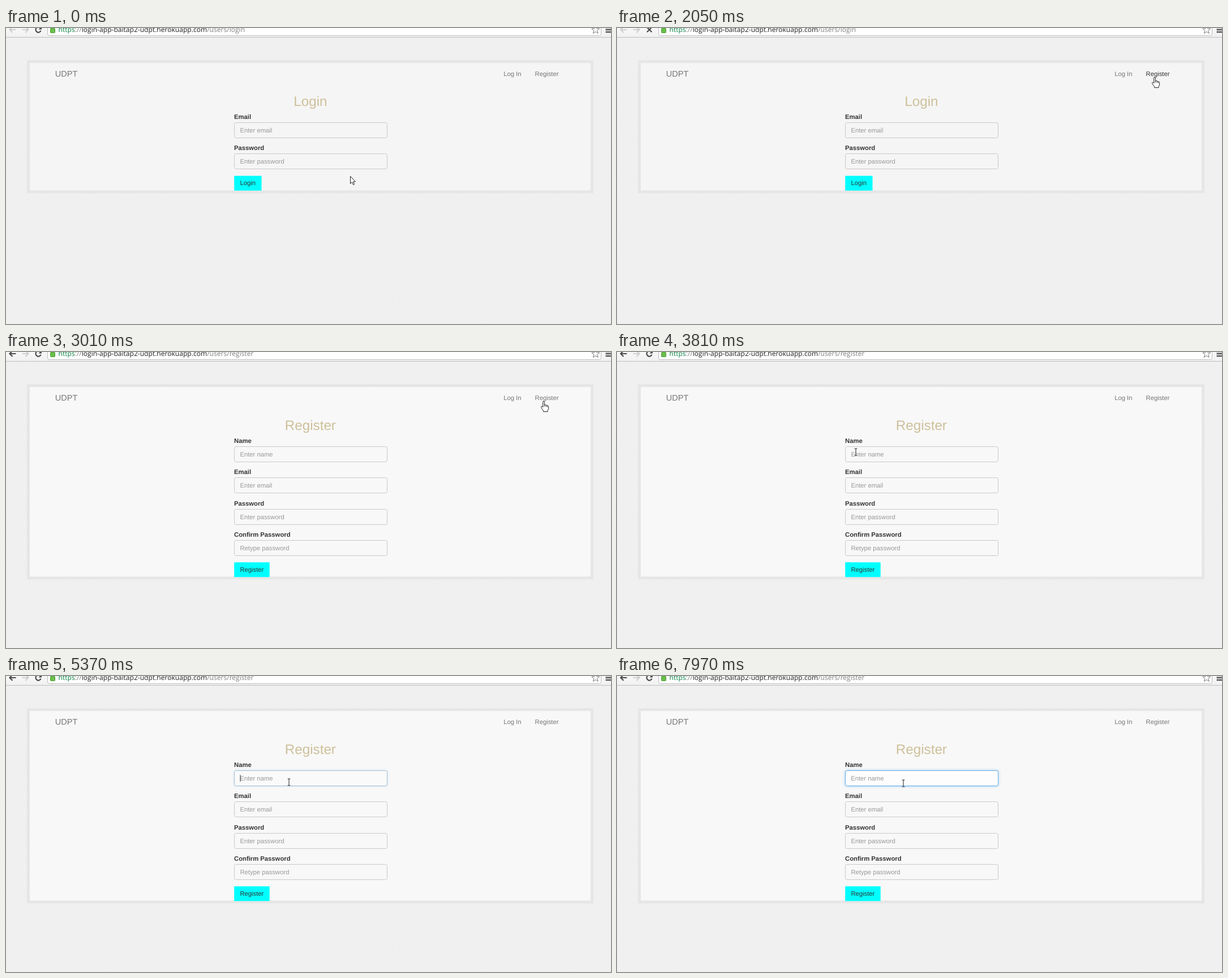
An HTML page for the animation above (8 s loop, 1069 by 524 pixels).

```html
<!DOCTYPE html>
<html lang="en">
<head>
<meta charset="utf-8">
<title>Register form</title>
<style>
html, body { margin: 0; width: 100%; height: 100%; overflow: hidden; background: #f1f1f1; }
svg { display: block; }
text { font: 11.28px "Liberation Sans", Arial, sans-serif; text-rendering: geometricPrecision; white-space: pre; fill: #777; }
.label { font-weight: bold; fill: #333; }
.hint { fill: #999; }
.title { font-size: 24.2px; fill: #cdc09a; text-anchor: middle; }
.brand { font-size: 14.5px; }
.button { fill: #333; }
.url { font: 12.07px "Open Sans", "Noto Sans", sans-serif; }
.input { fill: none; stroke: #c9c9c9; }
.icon { fill: none; stroke: #4a4a4a; stroke-width: 2.2; }
</style>
</head>
<body>
<svg width="1069" height="524" viewBox="0 0 1069 524">
  <defs>
    <pattern id="weave" width="4" height="4" patternUnits="userSpaceOnUse">
      <path fill="#f2f2f2" d="M0 0h4v4h-4z"/>
      <path fill="#e7e7e7" d="M0 0h1v1h-1zM2 2h1v1h-1z"/>
      <path fill="#ececec" d="M1 1h1v1h-1zM3 3h1v1h-1z"/>
    </pattern>
    <linearGradient id="bar" x2="0" y2="1">
      <stop stop-color="#f8f8f8"/><stop offset="1" stop-color="#f0f0f0"/>
    </linearGradient>
    <filter id="blur" x="-10%" y="-60%" width="120%" height="220%"><feGaussianBlur stdDeviation="2.8"/></filter>
  </defs>

  <rect width="1069" height="524" fill="url(#weave)"/>

  <!-- browser toolbar -->
  <rect width="1069" height="17" fill="url(#bar)"/>
  <path d="M0 16.5H1069" stroke="#bdbdbd"/>
  <path d="M73.5 -2V10.5Q73.5 13.5 76.5 13.5H1048.5Q1051.5 13.5 1051.5 10.5V-2" fill="#fff" stroke="#bcbcbc"/>
  <path id="back" class="icon" d="M17.5 3H7M11.5 -2L6.5 3L11.5 8"/>
  <path class="icon" style="stroke:#cfcfcf" d="M28.5 3H39M34.5 -2L39.5 3L34.5 8"/>
  <g id="reload"><path class="icon" d="M61 .3A4.7 4.7 0 1 0 61.6 4.7"/><path fill="#4a4a4a" d="M63 -3V2.5H57.5Z"/></g>
  <path id="stop" class="icon" d="M53 -1.2L61.4 7.2M61.4 -1.2L53 7.2"/>
  <path d="M80 1V-1.5A2.5 2.5 0 0 1 85 -1.5V1" fill="none" stroke="#888" stroke-width="1.3"/>
  <rect x="78.5" y=".5" width="8" height="8" rx="1" fill="#6abf4b" stroke="#4c9a35"/>
  <text class="url" x="92.6" y="7.4"><tspan fill="#0b8043">https</tspan><tspan fill="#808080">://</tspan><tspan fill="#222">login-app-baitap2-udpt.herokuapp.com</tspan><tspan id="path" fill="#808080"></tspan></text>
  <path d="M1041.8 -4L1043.7 .9L1048.8 1.2L1044.8 4.5L1046.2 9.4L1041.8 6.6L1037.4 9.4L1038.8 4.5L1034.8 1.2L1039.9 .9Z" fill="#fff" stroke="#777"/>
  <path class="icon" d="M1059.5 -.7H1069M1059.5 3.2H1069M1059.5 7.1H1069"/>

  <g id="login"></g>
  <g id="register"></g>
  <text class="brand" x="86.8" y="86">UDPT</text>
  <text x="879.2" y="85.2">Log In</text>
  <text id="link" x="934.5" y="85.2">Register</text>

  <g id="focus">
    <rect x="403" y="167" width="271" height="28" rx="3.5" fill="#66afe9" opacity=".6" filter="url(#blur)"/>
    <rect x="403.5" y="167.5" width="270" height="27" rx="3" fill="#fdfdfd" stroke="#66afe9"/>
    <text class="hint" x="413.2" y="185">Enter name</text>
  </g>
  <path id="caret" d="M414 175V187" stroke="#333"/>

  <path id="arrow" d="M.5 .5V13.6L3.5 10.8L5.6 15.6L7.6 14.7L5.6 10H9.4Z" fill="#fff" stroke="#222"/>
  <path id="hand" d="M-1.3 11V1.6Q-1.3 .4 0 .4Q1.3 .4 1.3 1.6V7Q3.6 5.8 4 7.7Q6.1 6.7 6.4 8.6Q8.6 8 8.6 10V13.5Q8.3 15.5 7 17V19H-.3V17.4Q-2.6 15 -4.2 11.7Q-4.8 9.8 -3.6 9.4Q-2.5 9.2 -1.3 11ZM1.3 7V10M4 8V10.5M6.4 8.8V11" fill="#fff" stroke="#222"/>
  <path id="beam" d="M-2.5 -6H-.7L0 -5.5L.7 -6H2.5M0 -5.5V5.5M-2.5 6H-.7L0 5.5L.7 6H2.5" fill="none" stroke="#333" stroke-width="1.1"/>
</svg>
<script>
const $ = id => document.getElementById(id);
const show = (id, on) => $(id).style.display = on ? "" : "none";

function buildPage(id, title, fill, fields, buttonWidth) {
  const end = 177.2 + 55.3 * fields.length;
  const rows = fields.map(([label, hint], i) => {
    const y = 55.3 * i;
    return `<text class="label" x="403" y="${160.9 + y}">${label}</text>
      <rect class="input" x="403.5" y="${Math.round(y) + 167.5}" width="270" height="27" rx="3"/>
      <text class="hint" x="413.4" y="${185 + y}">${hint}</text>`;
  });
  $(id).innerHTML = `<rect x="39.5" y="59.5" width="996" height="${Math.round(end) - 57.5}" fill="${fill}" stroke="#e6e6e6" stroke-width="5"/>
    <text class="title" x="537.9" y="138.2">${title}</text>${rows.join("")}
    <rect x="403.2" y="${end - 26.1}" width="${buttonWidth}" height="26.1" fill="#0ff"/>
    <text class="button" x="413.4" y="${end - 9.7}">${title}</text>`;
}

const email = ["Email", "Enter email"], password = ["Password", "Enter password"];
buildPage("login", "Login", "#f5f5f5", [email, password], 48.3);
buildPage("register", "Register", "#f8f8f8",
  [["Name", "Enter name"], email, password, ["Confirm Password", "Retype password"]], 62.5);

// pointer: start time, shape, position
const moves = [
  [0, "arrow", 608, 262], [680, "arrow", 643, 228], [800, "arrow", 646, 224],
  [920, "arrow", 761, 175], [1070, "arrow", 893, 115], [1190, "arrow", 923.5, 99.5],
  [1320, "hand", 946, 90], [1460, "hand", 950, 86.6], [3550, "arrow", 980, 213],
  [3690, "arrow", 582, 220], [3810, "beam", 422, 177], [3960, "beam", 412, 173],
  [4110, "beam", 420, 185], [4230, "beam", 440, 206], [4350, "beam", 466, 195],
  [4470, "beam", 488, 182], [4590, "beam", 503, 176.5], [4740, "beam", 495, 180],
  [4860, "beam", 486, 186], [4980, "beam", 490, 188], [5110, "beam", 500, 188],
  [5610, "beam", 504, 189], [5770, "beam", 506, 190]
];
const blinks = [5370, 5770, 6330, 6880, 7410, 7970];
const glow = [[5370, .4], [5490, .8], [5610, 1]];

function draw(t) {
  const registered = t >= 3010, loading = t >= 2050 && !registered;
  show("login", !registered);
  show("register", registered);
  show("stop", loading);
  show("reload", !loading);
  $("path").textContent = t < 2450 ? "/users/login" : "/users/register";
  $("back").style.stroke = t < 2450 ? "#cfcfcf" : "";
  $("link").style.fill = t >= 1320 && !registered ? "#333" : "";

  const step = glow.findLast(g => t >= g[0]);
  show("focus", step);
  $("focus").style.opacity = step ? step[1] : 0;
  show("caret", blinks.filter(b => t >= b).length % 2);

  const [, shape, x, y] = moves.findLast(m => t >= m[0]);
  for (const id of ["arrow", "hand", "beam"]) show(id, id === shape);
  $(shape).setAttribute("transform", `translate(${x} ${y})`);
}

const start = performance.now();
function tick() {
  draw((performance.now() - start) % 8000);
  requestAnimationFrame(tick);
}
tick();
</script>
</body>
</html>
```
